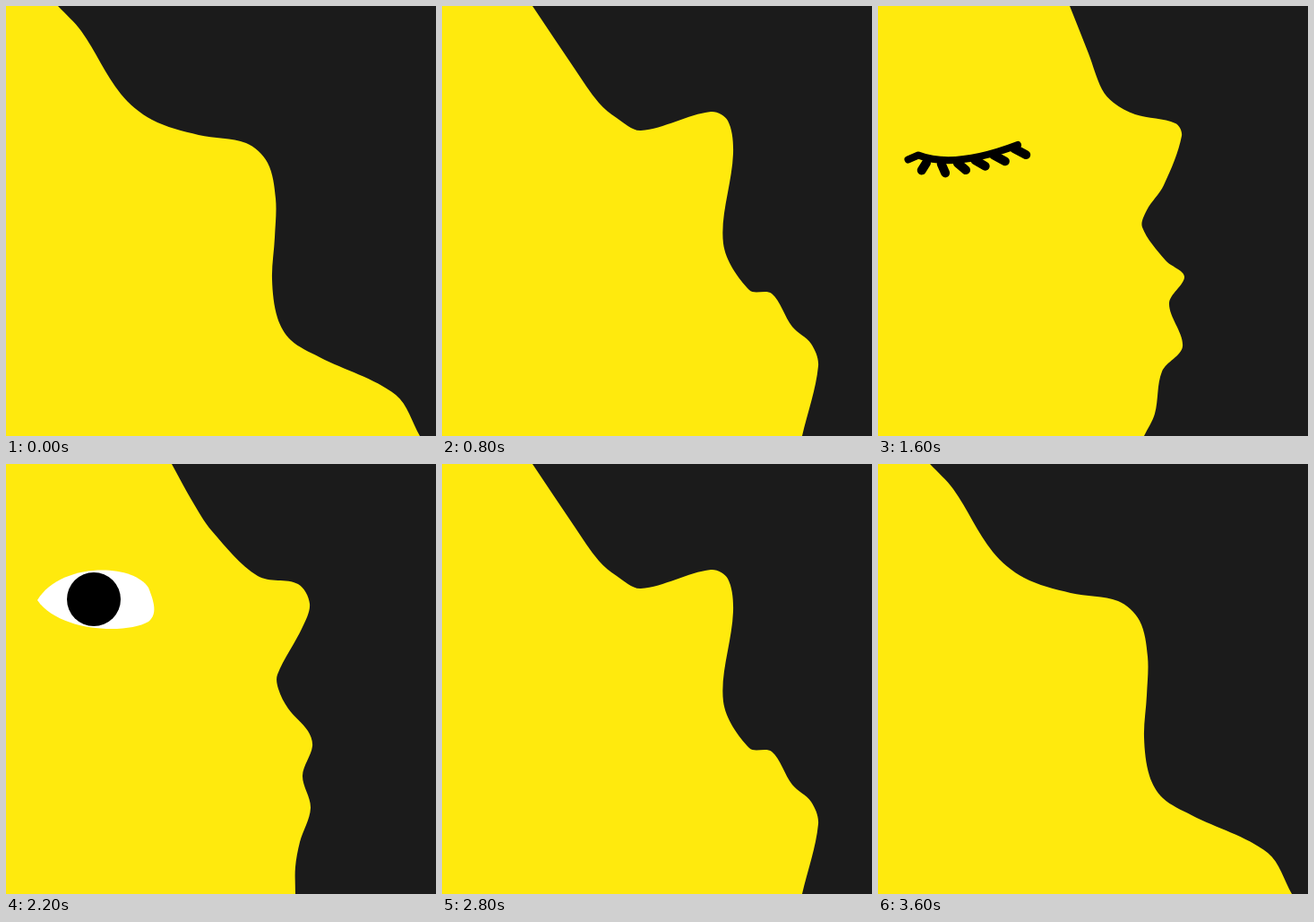
Recreate the animation shown at these times as an HTML page. Size 480 px wide and 480 px high, loop 3800 ms.

```html
<!DOCTYPE html>
<html lang="en">
<head>
<meta charset="utf-8">
<title>Profile</title>
<style>
  html, body { margin: 0; width: 100%; height: 100%; overflow: hidden; background: #1b1b1b; }
  svg { display: block; width: 100vw; height: 100vh; }
</style>
</head>
<body>
<svg viewBox="0 0 480 480">
  <rect width="480" height="480" fill="#1b1b1b"/>
  <path id="face" fill="#ffea0d"/>
  <g id="open">
    <path fill="#fff" d="M35 152C60 110 141 110 159 138C168 160 167 169 159 176C135 190 60 188 35 152Z"/>
    <circle cx="98" cy="151" r="30"/>
  </g>
  <g id="closed" fill="none" stroke="#000" stroke-linecap="round" stroke-linejoin="round">
    <path stroke-width="8" d="M33.500 171.500L45 166.500Q85 182 156 155"/>
    <path id="lashes" stroke-width="10"/>
  </g>
</svg>
<script>
const $ = id => document.getElementById(id);
const parse = s => s.split(' ').map(p => p.split(',').map(Number));
const mix = (a, b, k) => a.map((p, i) => p.map((v, j) => v + (b[i][j] - v) * k));
const dist = (a, b) => Math.hypot(b[0] - a[0], b[1] - a[1]);

// Smooth face outline; handle lengths follow the spacing of the points.
function outline(pts) {
  const last = pts.length - 1;
  const handle = (i, len) => {
    const a = pts[Math.max(0, i - 1)], b = pts[i], c = pts[Math.min(last, i + 1)];
    const k = len / 3 / (dist(a, b) + dist(b, c));
    return b.map((v, j) => v + (c[j] - a[j]) * k);
  };
  let d = 'M' + pts[0];
  for (let i = 0; i < last; i++) {
    const len = dist(pts[i], pts[i + 1]);
    d += `C${handle(i, len)} ${handle(i + 1, -len)} ${pts[i + 1]}`;
  }
  return d + 'V481H-1V-1H' + pts[0][0] + 'Z';
}

// Key points from forehead to chin; blended poses share their landmarks.
const wave = parse('58,0 84,28 128,98 163,127 215,144 268,153 292,175 301,215 300,258 297,305 303,348 318,373 350,392 435,434 462,480');
const bulge = parse('51,0 98,40 153,122 180,143 222,152 306,123 336,141 346,170 318,258 306,303 348,335 386,353 415,386 431,445 426,480');
const snout = parse('101,0 148,70 175,108 195,125 222,139 300,118 319,128 325,165 314,265 343,317 368,321 391,358 412,377 420,402 402,480');
const nose = parse('144,0 220,104 245,121 285,128 330,122 343,135 338,170 298,235 295,263 312,284 345,299 356,318 338,356 353,380 346,420 350,450 350,480');
const awake = parse('185,0 207,40 230,75 281,125 326,134 339,156 331,182 303,235 304,251 315,273 337,298 342,315 331,348 340,384 328,422 323,450 323,480');
const kiss = parse('214,0 235,53 250,93 263,108 287,121 332,131 339,145 319,200 300,228 295,247 321,284 342,302 325,332 340,380 317,408 309,455 297,480');

const poses = [
  { pts: wave },
  { pts: mix(wave, bulge, 0.5) },
  { pts: bulge },
  { pts: mix(bulge, snout, 0.5) },
  { pts: snout },
  { pts: nose },
  { pts: mix(nose, awake, 0.5), open: 'translate(11 16.500) scale(.89)' },
  { pts: awake, open: 'scale(1)' },
  { pts: kiss, closed: 'translate(0 0)' },
  { pts: kiss, closed: 'translate(-7 2)' }
].map(p => ({ ...p, d: outline(p.pts) }));

// Six lashes fan out along the lid, flattening towards the nose.
let lashes = '';
for (let k = 0; k < 1.1; k += 0.2) {
  const angle = (28 + 94 * (1 - k) ** 4) * Math.PI / 180, len = 10 + 5 * k;
  lashes += `M${54 + 80 * k + 18 * k * k} ${175 + 12 * k - 28 * k * k}`
    + `l${len * Math.cos(angle)} ${len * Math.sin(angle)}`;
}
$('lashes').setAttribute('d', lashes);

// Morph forward, blink, hold, then play the same poses backwards.
const walk = [0, 1, 2, 3, 4, 5, 6, 7].map(i => [i, 200]);
const steps = [...walk, [8, 100], [9, 100], [8, 400], ...walk.slice().reverse()];
const total = steps.reduce((sum, s) => sum + s[1], 0);

function setEye(id, transform) {
  $(id).style.display = transform ? '' : 'none';
  if (transform) $(id).setAttribute('transform', transform);
}

let shown = -1;
function show(i) {
  if (i === shown) return;
  shown = i;
  $('face').setAttribute('d', poses[i].d);
  setEye('open', poses[i].open);
  setEye('closed', poses[i].closed);
}

const start = performance.now();
function tick() {
  let t = (performance.now() - start) % total, k = 0;
  while (t >= steps[k][1]) t -= steps[k++][1];
  show(steps[k][0]);
  requestAnimationFrame(tick);
}
tick();
</script>
</body>
</html>
```
